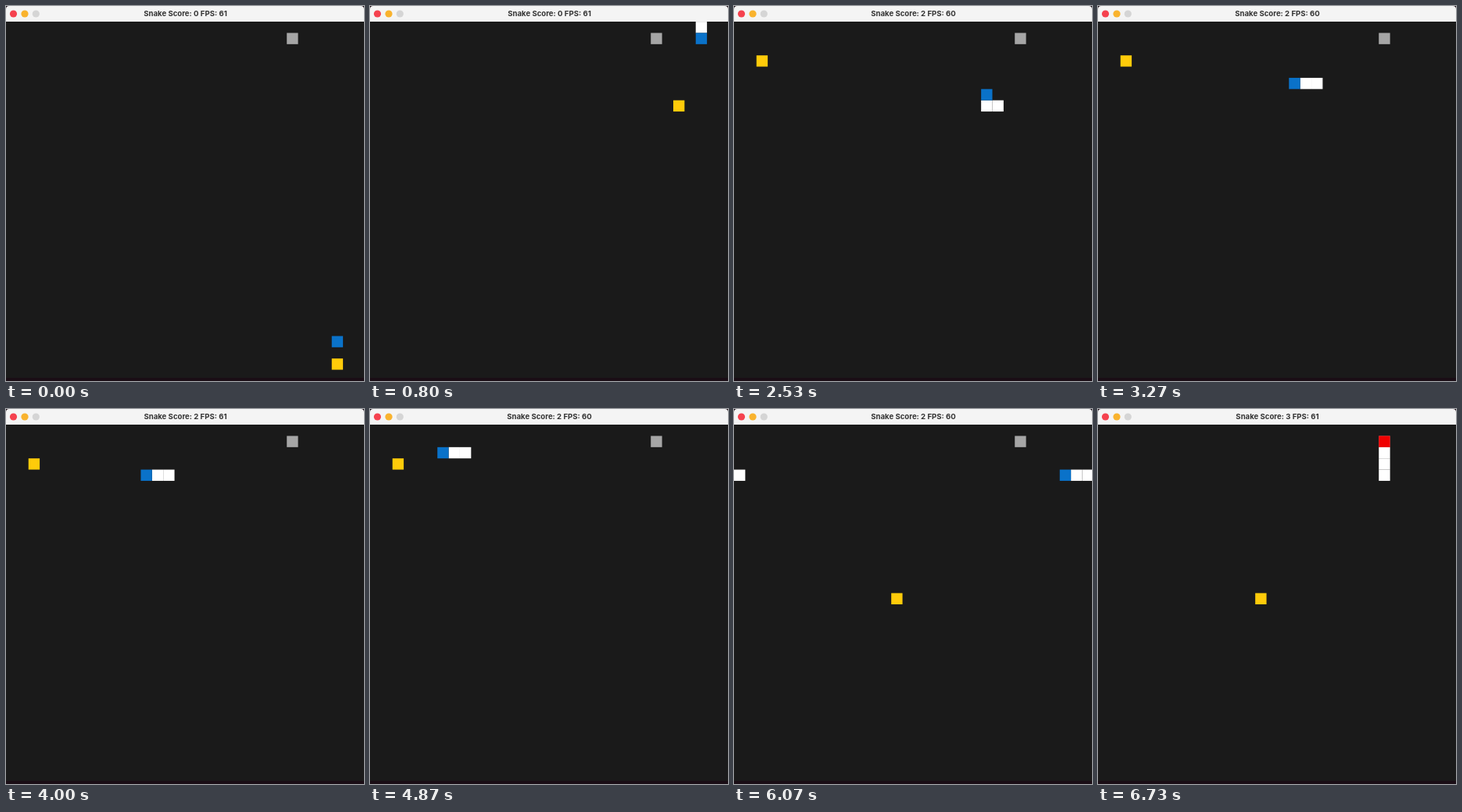
Animation of 458 by 480 pixels, one loop 7470 ms. Source, as an HTML page:

```html
<!DOCTYPE html>
<html lang="en">
<head>
<meta charset="utf-8">
<title>Snake</title>
<style>
  html, body { margin: 0; width: 100%; height: 100%; overflow: hidden; background: #1a0d15; }
  svg { display: block; width: 458px; height: 480px; }
  text { font: 700 9.6px Inter, "Open Sans", sans-serif; fill: #333; text-anchor: middle; }
</style>
</head>
<body>
<svg viewBox="0 0 458 480">
  <path fill="#f4f4f4" d="M0 20V4Q0 0 4 0H454Q458 0 458 4V20Z"/>
  <rect y="20" width="458" height="456" fill="#1a1a1a"/>
  <circle cx="9.5" cy="10" r="4.6" fill="#f5424f"/>
  <circle cx="24" cy="10" r="4.6" fill="#f9b32e"/>
  <circle cx="38.3" cy="10" r="4.6" fill="#d5d5d5"/>
  <text id="title" x="229.5" y="13.3"></text>
  <g id="board"></g>
</svg>
<script>
const LOOP = 7470, GRID = 32, CELL = 14.37, TOP = 20.1;
const DIRS = { U: [0, -1], D: [0, 1], L: [-1, 0] };

// Each leg: direction, then the wait before every move in ticks of 1/15 s.
const LEGS = ['D32223213222', 'L2122221', 'U21', 'L32122222', 'U2', 'L122212',
              'U21', 'L212222', 'D12', 'L112122121', 'U121'];
const FOODS = [[0, 29, 30], [5, 27, 7], [28, 2, 3], [83, 14, 15]];
const TITLES = [[0, 0, 61], [20, 1, 61], [35, 2, 60], [50, 2, 61], [65, 2, 60], [96, 3, 61]];
const WALL = [25, 1];

const toMs = tick => Math.round(tick * 20 / 3) * 10;
const wrap = n => (n + GRID) % GRID;
const same = (a, b) => a.x === b[0] && a.y === b[1];
const latest = (list, ms) => list.filter(e => toMs(e[0]) <= ms).pop();

// Walk the legs once, growing the snake on the move after each meal.
const moves = [{ x: 29, y: 28, tick: 0, size: 1 }];
let eaten = 0;
for (const [dir, ...waits] of LEGS) {
  const [dx, dy] = DIRS[dir];
  for (const wait of waits) {
    const last = moves[moves.length - 1];
    if (same(last, FOODS[eaten].slice(1))) eaten++;
    moves.push({
      x: wrap(last.x + dx), y: wrap(last.y + dy),
      tick: last.tick + Number(wait), size: eaten + 1
    });
  }
}

const board = document.getElementById('board');
const title = document.getElementById('title');

function makeCell(fill) {
  const cell = document.createElementNS('http://www.w3.org/2000/svg', 'rect');
  cell.setAttribute('width', CELL);
  cell.setAttribute('height', CELL);
  cell.setAttribute('fill', fill);
  return board.appendChild(cell);
}

function place(cell, x, y) {
  cell.setAttribute('x', x * CELL);
  cell.setAttribute('y', TOP + y * CELL);
}

const food = makeCell('#ffcb0a');
place(makeCell('#a6a6a6'), ...WALL);
const body = [1, 2, 3].map(() => makeCell('#fff'));
const head = makeCell('#0a72c9');

function draw(ms) {
  let n = moves.length - 1;
  while (toMs(moves[n].tick) > ms) n--;
  const now = moves[n];

  const [, fx, fy] = latest(FOODS, ms);
  place(food, fx, fy);
  place(head, now.x, now.y);
  head.setAttribute('fill', same(now, WALL) ? '#f00000' : '#0a72c9');
  body.forEach((cell, i) => {
    const shown = i + 1 < now.size;
    cell.setAttribute('visibility', shown ? 'visible' : 'hidden');
    if (shown) place(cell, moves[n - i - 1].x, moves[n - i - 1].y);
  });

  const [, score, fps] = latest(TITLES, ms);
  const label = `Snake Score: ${score} FPS: ${fps}`;
  if (title.textContent !== label) title.textContent = label;
}

const start = performance.now();
function frame() {
  draw((performance.now() - start) % LOOP);
  requestAnimationFrame(frame);
}
frame();
</script>
</body>
</html>
```
